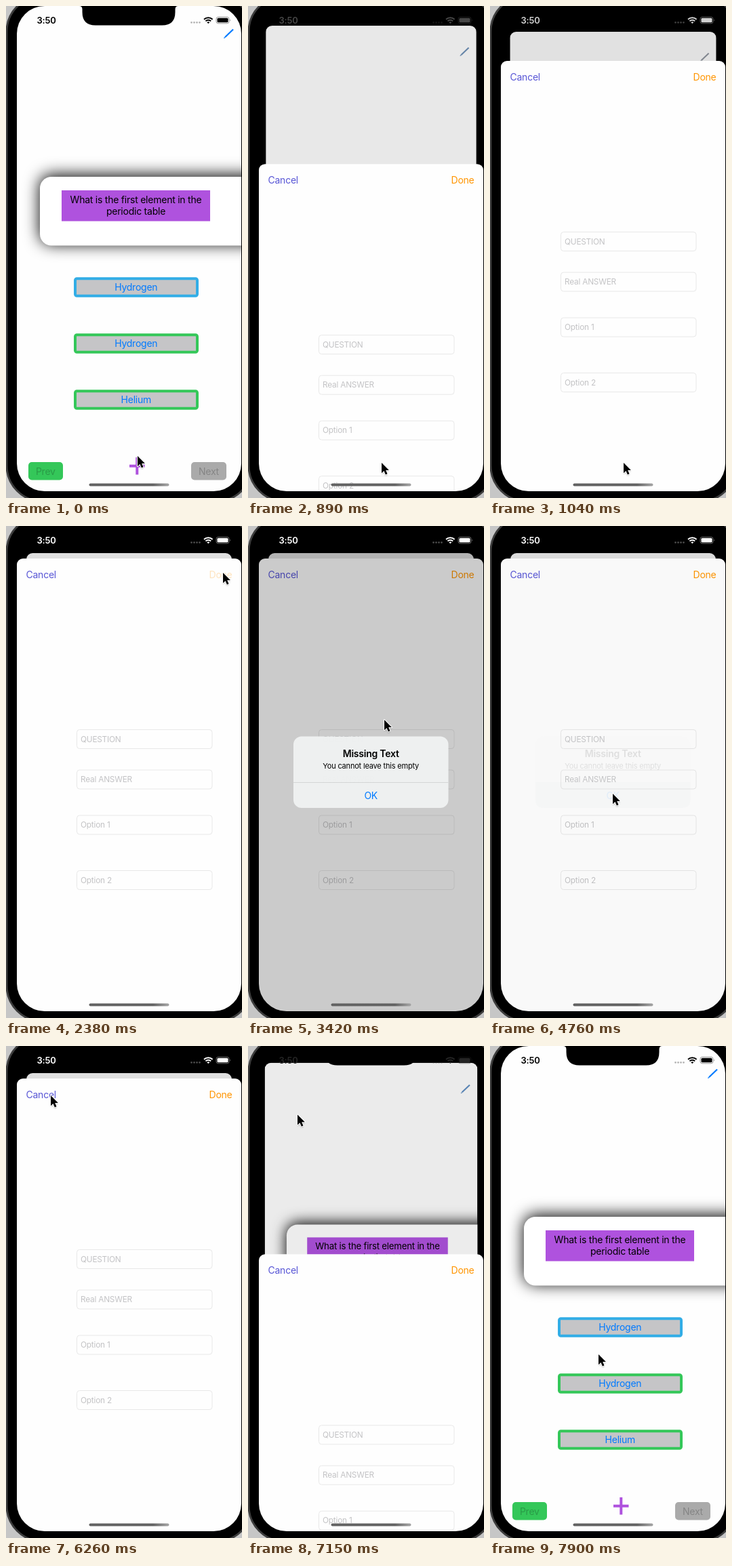
An HTML page for the animation above (8000 ms loop, 348 px wide and 726 px high).

```html
<!DOCTYPE html>
<html lang="en">
<head>
<meta charset="utf-8">
<title>Quiz app</title>
<style>
  html, body { margin: 0; height: 100%; overflow: hidden; background: #c6c6c6; }
  svg { display: block; width: 348px; height: 726px; --tint: #007aff; --plus: #af52de; --status: #000; }
  text { font: 14px Inter, "Noto Sans", sans-serif; letter-spacing: -.017em; }
  .mid { text-anchor: middle; }
  .semi { font-weight: 600; }
  .tint { fill: var(--tint); }
  .hint { font-size: 11.8px; fill: #c3c3c5; }
</style>
</head>
<body>
<svg viewBox="0 0 348 726">
  <defs>
    <clipPath id="screenClip"><rect x="16" width="331" height="716" rx="41"/></clipPath>
    <clipPath id="cardClip"><rect x="16" width="331" height="716" rx="10"/></clipPath>
    <filter id="blur" x="-20%" y="-50%" width="140%" height="200%"><feGaussianBlur stdDeviation="11.5"/></filter>
    <filter id="soft" x="-50%" y="-50%" width="200%" height="200%"><feGaussianBlur stdDeviation="1"/></filter>
    <linearGradient id="bar"><stop offset=".8" stop-color="#626262"/><stop offset="1" stop-color="#a6a6a6"/></linearGradient>
    <path id="arrow" d="M0 0V15.2L3.5 12 5.9 17.4 8.5 16.3 6.2 11H10.9Z"/>
  </defs>

  <rect x="1" y="-15" width="362" height="746" rx="53" stroke="#3d3d3d" stroke-width="3"/>

  <g clip-path="url(#screenClip)">
    <g id="home" clip-path="url(#cardClip)">
      <rect x="16" width="331" height="716" fill="#fefefe"/>
      <rect x="50" y="249.4" width="340" height="101.5" rx="17" filter="url(#blur)"/>
      <rect x="50" y="252" width="340" height="101.5" rx="17" fill="#fff"/>
      <rect x="82" y="272" width="219" height="45.5" fill="#af52de"/>
      <text class="mid" x="191.5" y="291">What is the first element in the</text>
      <text class="mid" x="191.5" y="308">periodic table</text>
      <g id="answers"></g>
      <rect x="33" y="673" width="51" height="26.5" rx="5" fill="#34c759"/>
      <text class="mid" x="58.3" y="691.5" fill="#2a9a47">Prev</text>
      <rect x="273" y="673" width="52" height="26.5" rx="5" fill="#aaa"/>
      <text class="mid" x="299" y="691.5" fill="#858585">Next</text>
      <path id="plus" d="M182 678.7H204.5M193.3 666V691.5" stroke="var(--plus)" stroke-width="4"/>
      <path d="M323 46L335 34.5" stroke="var(--tint)" stroke-width="2.2"/>
      <path d="M321 48L322 45.6 323.6 47Z" class="tint"/>
      <rect id="homeDim" x="16" width="331" height="716"/>
    </g>

    <g id="sheet">
      <rect x="16" y="48" width="331" height="720" rx="9" fill="#fefefe"/>
      <text id="cancel" x="29.5" y="77" fill="#5856d6">Cancel</text>
      <text id="done" x="333.5" y="77" text-anchor="end" fill="#ff9500">Done</text>
      <g id="fields"></g>
    </g>

    <path id="alertDim" d="M16 48H30V40H333V48H347V716H16Z"/>
    <g id="alert">
      <rect x="67" y="310.5" width="228.5" height="105.5" rx="12" fill="#f0f2f2" fill-opacity=".97"/>
      <path id="okPress" d="M67 379H295.5V404Q295.5 416 283.5 416H79Q67 416 67 404Z" fill="#dcdede"/>
      <path d="M67 378.5H295.5" stroke="#d3d5d5"/>
      <text class="mid semi" x="181.2" y="341">Missing Text</text>
      <text class="mid" x="181.2" y="358" style="font-size:11px">You cannot leave this empty</text>
      <text class="mid" x="181.2" y="403" fill="#007aff">OK</text>
    </g>

    <path d="M108 0Q112.500 0 112.500 5V9Q112.500 28.500 132 28.500H230Q249.500 28.500 249.500 9V5Q249.500 0 254 0Z"/>
    <rect x="122.500" y="704.500" width="118" height="4" rx="2" fill="url(#bar)"/>

    <g fill="var(--status)">
      <text class="semi" x="45.500" y="25.500" style="font-size:13px">3:50</text>
      <path d="M273.500 24.300h15" fill="none" stroke="var(--status)" stroke-width="2.800" stroke-linecap="round" stroke-dasharray="0 4" opacity=".3"/>
      <path d="M292 19.800A9 9 0 0 1 304.600 19.800M294.400 22.300A5.600 5.600 0 0 1 302.200 22.300" fill="none" stroke="var(--status)" stroke-width="1.900"/>
      <path d="M298.300 26L296.200 23.900Q298.300 22.400 300.400 23.900Z"/>
      <rect x="310" y="16.200" width="19" height="9.600" rx="3" fill="none" stroke="var(--status)" opacity=".4"/>
      <rect x="311.500" y="17.700" width="16" height="6.600" rx="1.600"/>
      <path d="M330.500 19.500Q332.300 21 330.500 22.500Z" opacity=".5"/>
    </g>
  </g>

  <g id="cursor">
    <use href="#arrow" y="1.500" opacity=".4" filter="url(#soft)"/>
    <use href="#arrow" stroke="#fff" stroke-width="2" stroke-linejoin="round"/>
    <use href="#arrow"/>
  </g>
</svg>

<script>
const el = id => document.getElementById(id);
const svg = document.querySelector('svg');
const LOOP = 8000, TICK = 148.95;

el('answers').innerHTML = [
  [400, '#32ade6', 'Hydrogen'], [483, '#34c759', 'Hydrogen'], [566, '#34c759', 'Helium']
].map(([y, color, label]) => `
  <rect x="102" y="${y + 2.2}" width="180" height="25.600" rx="2.500" fill="#c5c5c7" stroke="${color}" stroke-width="4"/>
  <text class="mid tint" x="191.800" y="${y + 20}">${label}</text>`).join('');

el('fields').innerHTML = [
  [300, 'QUESTION'], [359.5, 'Real ANSWER'], [426.5, 'Option 1'], [508, 'Option 2']
].map(([y, label]) => `
  <rect x="104.500" y="${y + .5}" width="199.500" height="28" rx="4" fill="none" stroke="#e8e8e8"/>
  <text class="hint" x="110" y="${y + 18.7}">${label}</text>`).join('');

// Cursor path: tick, x, y
const cursorPath = [
  [0, 194, 664], [2, 197, 674], [7, 197, 674], [11, 326, 109], [12, 326, 109], [14, 320, 69],
  [20, 320, 69], [23, 201, 286], [27, 181, 395], [35, 181, 395], [37, 97, 102],
  [38, 97, 102], [42, 66, 73], [47, 66, 73], [53, 160, 455]
];

function cursorAt(tick) {
  const i = cursorPath.findIndex(key => key[0] >= tick);
  if (i < 1) return cursorPath[0].slice(1);
  const [t0, x0, y0] = cursorPath[i - 1], [t1, x1, y1] = cursorPath[i];
  const u = (tick - t0) / (t1 - t0), s = u * u * (3 - 2 * u);
  return [x0 + (x1 - x0) * s, y0 + (y1 - y0) * s];
}

// Critically damped spring from 0 to 1, t in ms
function spring(t) {
  const w = Math.max(0, t) * .0148;
  return 1 - (1 + w) * Math.exp(-w);
}

const settle = v => v < .002 ? 0 : v > .998 ? 1 : v;

function alertAlpha(tick) {
  if (tick < 17 || tick > 32) return 0;
  return { 17: .35, 18: .9, 31: .6, 32: .1 }[tick] ?? 1;
}

const opacity = (id, value) => el(id).setAttribute('opacity', value);
const move = (id, value) => el(id).setAttribute('transform', value);

function draw(now) {
  const tick = Math.floor((now % LOOP + 12) / TICK), t = tick * TICK;

  const shown = settle(spring(t - 720) - spring(t - 7060));
  const scale = 1 - .085 * shown;
  move('home', `translate(${181.5 * (1 - scale)} ${40 * shown}) scale(${scale})`);
  move('sheet', `translate(0 ${678 * (1 - shown)})`);
  opacity('homeDim', .12 * shown);

  const light = Math.round(255 * shown ** 4);
  const muted = color => `color-mix(in srgb, ${color}, #98989c ${shown * 100}%)`;
  svg.style.setProperty('--status', `rgb(${light},${light},${light})`);
  svg.style.setProperty('--tint', muted('#007aff'));
  svg.style.setProperty('--plus', muted('#af52de'));

  opacity('plus', tick === 4 ? .25 : 1);
  opacity('done', tick === 16 ? .25 : tick === 17 ? .6 : 1);
  opacity('cancel', tick === 46 || tick === 47 ? .25 : 1);

  const alpha = alertAlpha(tick);
  const zoom = tick < 20 ? 1 + .15 * (1 - alpha) : 1;
  opacity('alertDim', .2 * alpha);
  opacity('alert', alpha);
  move('alert', `translate(181.2 363) scale(${zoom}) translate(-181.2 -363)`);
  opacity('okPress', tick >= 29 ? 1 : 0);

  move('cursor', `translate(${cursorAt(tick)})`);
  requestAnimationFrame(draw);
}
draw(performance.now());
</script>
</body>
</html>
```
